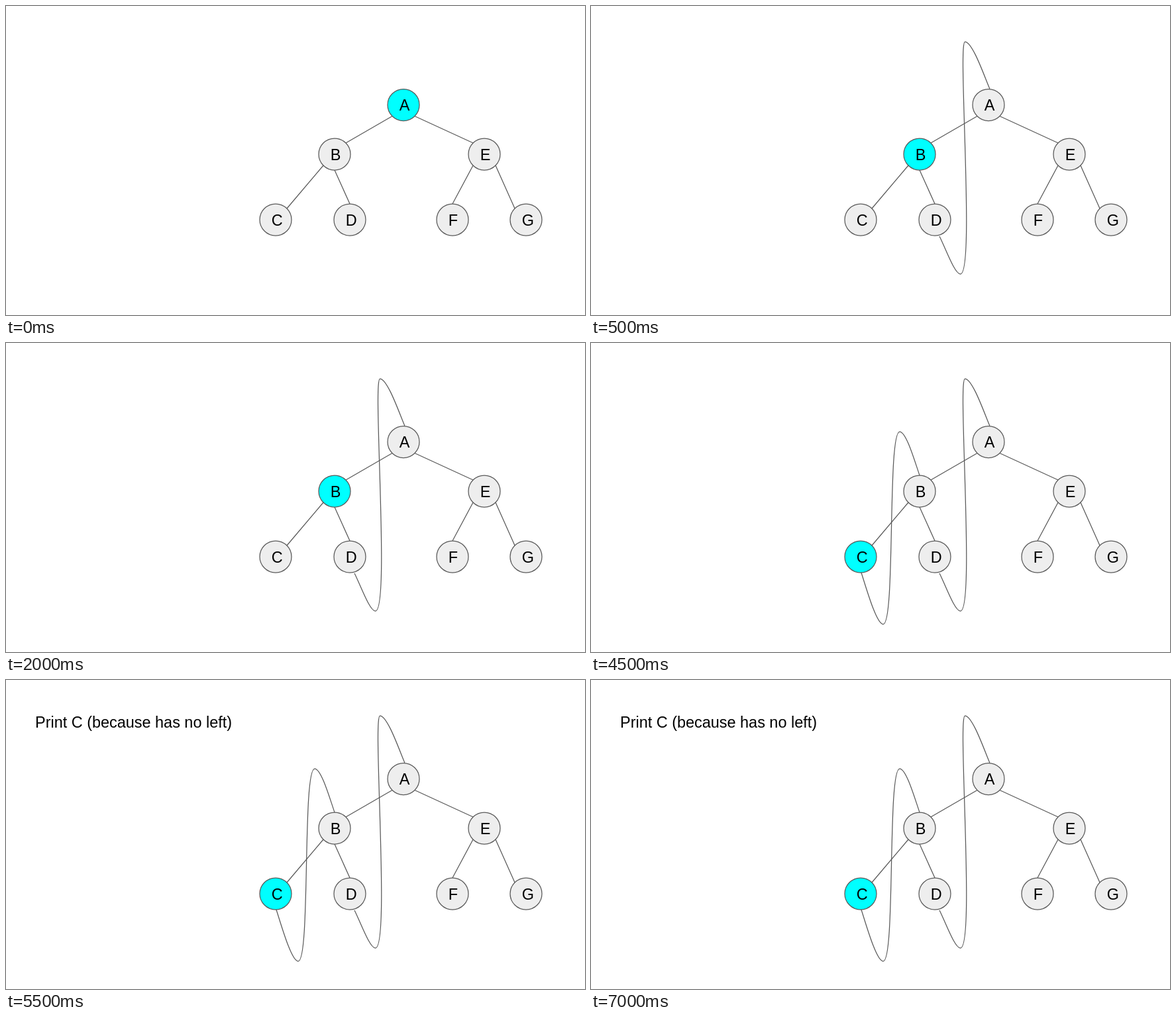
Recreate the animation shown at these times as an HTML page. Size 874 px wide and 467 px high, loop 8 s.

```html
<!DOCTYPE html>
<html lang="en">
<head>
<meta charset="utf-8">
<title>Tree traversal</title>
<style>
  html, body { margin: 0; width: 100%; height: 100%; overflow: hidden; background: #fff; }
  svg { display: block; width: 874px; height: 467px; }
  path, circle { stroke: #595959; stroke-width: 1.25; }
  path { fill: none; }
  circle { fill: #eee; }
  circle.active { fill: #0ff; }
  text { font: 23.45px Arial, "Liberation Sans", sans-serif; fill: #000; }
</style>
</head>
<body>
<svg viewBox="0 0 874 467">
  <path d="M583 166.5L513 207M617 166.5L705 207M479 241L424 306M496 248L519 299M705 241L674 299M739 241L768 306"/>
  <path id="loopA" d="M602 125.5C594 107 576 54 564.5 54S580 405 557.5 405C549 405 536 368 526 348"/>
  <path id="loopB" d="M496 200C489 180 476 134 466 134C447 134 460 425 441 425C431 425 416 372 408 347"/>
  <g id="nodes"></g>
  <text id="note" x="44" y="72.3">Print C (because has no left)</text>
</svg>
<script>
const DURATION = 8000;
const nodes = {
  A: [600, 149.5], B: [496, 224], C: [407, 323], D: [519, 323],
  E: [722, 224], F: [674, 323], G: [785, 323]
};
const byId = id => document.getElementById(id);

byId('nodes').innerHTML = Object.entries(nodes).map(([name, [x, y]]) =>
  `<circle id="${name}" cx="${x}" cy="${y}" r="24"/><text x="${x - 6.2}" y="${y + 8.5}">${name}</text>`
).join('');

const show = (id, visible) => byId(id).setAttribute('visibility', visible ? 'visible' : 'hidden');

function render(now) {
  const t = now % DURATION;
  const active = t < 500 ? 'A' : t < 3000 ? 'B' : 'C';
  for (const name in nodes) byId(name).classList.toggle('active', name === active);
  show('loopA', t >= 500);
  show('loopB', t >= 3000);
  show('note', t >= 5500);
}

const start = performance.now();
function tick() {
  render(performance.now() - start);
  requestAnimationFrame(tick);
}
tick();
</script>
</body>
</html>
```
